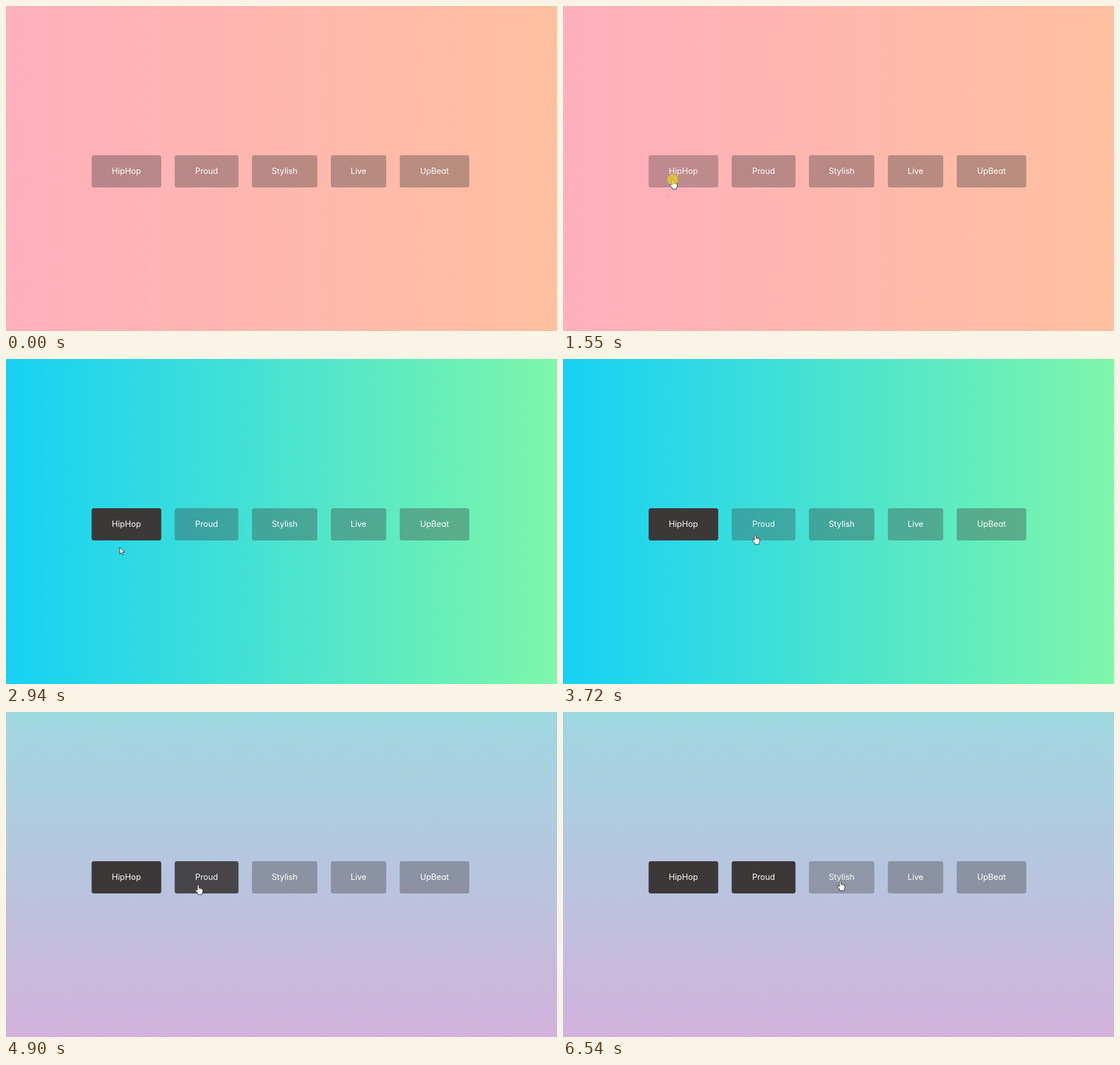
Write an HTML page that moves like this. It is 975 px wide and 575 px high and loops after 8 s.

```html
<!DOCTYPE html>
<html lang="en">
<head>
<meta charset="utf-8">
<title>Mood buttons</title>
<style>
  html, body { margin: 0; width: 100%; height: 100%; overflow: hidden; }
  svg { display: block; width: 100vw; height: 100vh; }
  text {
    font: 400 14.5px Inter, "Open Sans", sans-serif;
    font-feature-settings: "cv11";
    fill: #fff;
    text-anchor: middle;
  }
</style>
</head>
<body>
<svg viewBox="0 0 975 575">
  <defs>
    <linearGradient id="rose"><stop stop-color="#ffafbd"/><stop offset="1" stop-color="#ffc0a0"/></linearGradient>
    <linearGradient id="mint"><stop stop-color="#16d1f4"/><stop offset="1" stop-color="#7ef6ab"/></linearGradient>
    <linearGradient id="dusk" x2="0" y2="1"><stop stop-color="#9ed8e1"/><stop offset="1" stop-color="#d2b2dc"/></linearGradient>
  </defs>
  <rect id="bg" width="975" height="575"/>
  <g id="buttons"></g>
  <path id="trail" d="M182.5 331 Q185 337.5 192 337" fill="none" stroke="#c9b3b3" stroke-width="1.6" opacity=".75"/>
  <g id="cursor" fill="#fff" stroke="#1c1c22" stroke-width=".9" stroke-linejoin="round">
    <path id="arrow" d="M0 0V12L2.8 9.5 4.7 13.8 6.7 13 4.9 8.8H8.7Z"/>
    <g id="hand">
      <path d="M-1.4 1.4Q-1.4 0 0 0Q1.4 0 1.4 1.4V5.2Q3.4 4.6 3.8 6Q5.6 5.4 6.2 6.8Q8.2 6.4 8.2 8.4V11.5Q8.2 13.4 6.8 15V17H-.8V15Q-3.2 12.4 -4.8 9.8Q-5.2 7.8 -3.4 8.2L-1.4 9.8Z"/>
      <path d="M1.4 5.2V8M3.8 6V8.3M6.2 6.8V8.6" stroke-width=".6"/>
    </g>
  </g>
  <circle id="dot" fill="#e6e40f" fill-opacity=".62"/>
</svg>
<script>
const LOOP = 8000, TOP = 264, HEIGHT = 57;
const $ = id => document.getElementById(id);
const show = (el, on) => el.setAttribute("visibility", on ? "visible" : "hidden");

function add(parent, tag, attrs) {
  const el = document.createElementNS("http://www.w3.org/2000/svg", tag);
  for (const k in attrs) el.setAttribute(k, attrs[k]);
  return parent.appendChild(el);
}

// label, left, width, time it becomes active
const buttons = [
  ["HipHop", 151.5, 123.2, 1700],
  ["Proud", 298.5, 112.9, 4900],
  ["Stylish", 435.2, 115.7, Infinity],
  ["Live", 574.8, 98, Infinity],
  ["UpBeat", 696.7, 123.1, Infinity]
].map(([label, x, w, on]) => {
  const g = add($("buttons"), "g", {});
  const box = add(g, "rect", { x, y: TOP, width: w, height: HEIGHT, rx: 4, fill: "#3c3838" });
  add(g, "text", { x: x + w / 2, y: 297.4 }).textContent = label;
  return { g, box, x, w, on };
});

// Each move advances in equal steps along [time, x, y] points.
const moves = [
  { steps: 10, path: [[610, 266, 556], [850, 238, 470], [1005, 204, 380], [1163, 184, 335], [1400, 194, 307]] },
  { steps: 10, path: [[2940, 201, 333], [3096, 216, 402], [3252, 250, 438], [3408, 297, 411], [3564, 330, 344], [3720, 340, 311]] },
  { steps: 2, path: [[3810, 340, 309], [3960, 340, 306]] },
  { steps: 8, path: [[5910, 345, 324], [6067, 385, 371], [6225, 455, 374], [6382, 499, 336], [6540, 490.5, 299]] }
];

function pointer(t) {
  const move = moves.filter(m => t >= m.path[0][0]).pop();
  if (!move) return null;
  const p = move.path, start = p[0][0], end = p[p.length - 1][0];
  const step = (end - start) / move.steps;
  const q = Math.min(end, start + Math.floor((t - start) / step + 1e-6) * step);
  let i = 0;
  while (i < p.length - 2 && q > p[i + 1][0]) i++;
  const [a, b] = [p[i], p[i + 1]];
  const k = (q - a[0]) / (b[0] - a[0]);
  return { x: a[1] + (b[1] - a[1]) * k, y: a[2] + (b[2] - a[2]) * k };
}

function dotRadius(t) {
  if (t >= 1470 && t < 1550) return 7.5;
  return (t >= 1550 && t < 1700) || (t >= 4820 && t < 4900) ? 9.4 : 0;
}

function draw(t) {
  const p = pointer(t);
  let over = false;
  $("bg").setAttribute("fill", `url(#${t < 1700 ? "rose" : t < 4900 ? "mint" : "dusk"})`);
  for (const b of buttons) {
    const hover = !!p && p.x >= b.x && p.x <= b.x + b.w && p.y >= TOP && p.y <= TOP + HEIGHT;
    over = over || hover;
    b.box.setAttribute("fill-opacity", t >= b.on ? 1 : .36);
    b.g.setAttribute("opacity", hover ? .9 : 1);
  }
  show($("arrow"), p && !over);
  show($("hand"), p && over);
  show($("trail"), t >= 1321 && t < 1700);
  $("dot").setAttribute("r", dotRadius(t));
  if (p) {
    $("cursor").setAttribute("transform", `translate(${p.x} ${p.y})`);
    $("dot").setAttribute("cx", p.x);
    $("dot").setAttribute("cy", p.y);
  }
}

const t0 = performance.now();
function tick() {
  draw((performance.now() - t0) % LOOP);
  requestAnimationFrame(tick);
}
tick();
</script>
</body>
</html>
```
